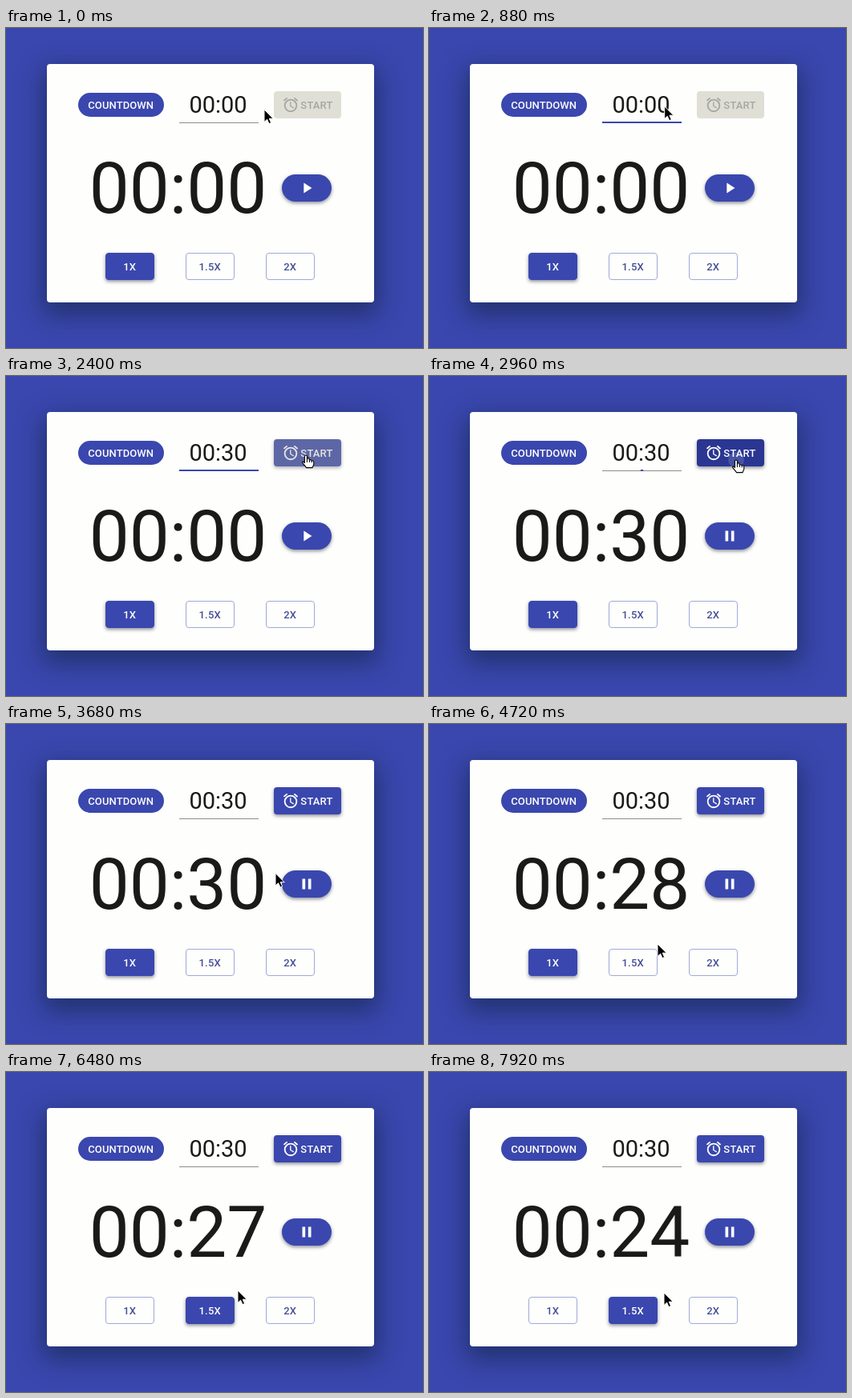
Recreate the animation shown at these times as an HTML page. Size 520 by 400 pixels, loop 8 s.

```html
<!DOCTYPE html>
<html lang="en">
<head>
<meta charset="utf-8">
<title>Countdown</title>
<style>
  html, body { margin: 0; width: 100%; height: 100%; overflow: hidden; background: #3a47ae; }
  #stage { position: relative; width: 520px; height: 400px; overflow: hidden; background: #3a47ae; font-family: Roboto, sans-serif; }
  #stage > * { position: absolute; box-sizing: border-box; }
  #card { left: 51px; top: 45px; width: 408px; height: 298px; border-radius: 4px; background: #fefefc; box-shadow: 0 11px 30px 5px rgba(24, 42, 86, .7); }
  .btn { display: flex; align-items: center; justify-content: center; overflow: hidden; height: 34px; border-radius: 4px; font-size: 13px; font-weight: 500; letter-spacing: .2px; color: #fefefc; background: #3a47ae; }
  #chip { left: 90px; top: 81px; width: 106.5px; height: 30px; border-radius: 15px; letter-spacing: .1px; }
  #start { left: 334px; top: 79px; width: 84px; }
  #start svg { margin-right: 1px; }
  #play { left: 344px; top: 183px; width: 62px; border-radius: 17px; box-shadow: 0 2px 4px rgba(30, 36, 60, .5); }
  .speed { top: 281px; width: 61.5px; border: 1px solid; }
  .btn svg { width: 22px; height: 22px; fill: currentColor; flex: none; }
  .time { display: flex; align-items: center; justify-content: center; color: #1a1a18; white-space: pre; }
  #field { left: 215px; top: 80px; width: 99px; height: 32px; font-size: 29px; }
  #clock { left: 95px; top: 150px; width: 239px; height: 100px; font-size: 89px; }
  #line { left: 216px; top: 118px; width: 99px; height: 1px; background: #8d8d8b; }
  #focus { left: 216px; top: 117px; width: 99px; height: 2px; background: #3a47ae; }
  .ripple { position: absolute; border-radius: 50%; background: #7480c4; }
  #arrow, #hand { left: 0; top: 0; width: 20px; height: 22px; overflow: visible; }
</style>
</head>
<body>
<div id="stage">
  <div id="card"></div>
  <div id="chip" class="btn">COUNTDOWN</div>
  <div id="field" class="time"></div>
  <div id="line"></div>
  <div id="focus"></div>
  <div id="start" class="btn">
    <i class="ripple"></i>
    <svg viewBox="0 0 24 24" style="position:relative"><path d="M22 5.7l-4.6-3.8-1.3 1.5 4.6 3.9zM7.9 3.4L6.6 1.9 2 5.7l1.3 1.5zM12.5 8H11v6l4.75 2.85.75-1.23-4-2.37zM12 4a9 9 0 1 0 0 18a9 9 0 1 0 0-18zm0 16a7 7 0 1 1 0-14a7 7 0 1 1 0 14z"/></svg>
    <span style="position:relative">START</span>
  </div>
  <div id="clock" class="time"></div>
  <div id="play" class="btn"><svg viewBox="0 0 24 24"><path/></svg></div>
  <div id="one" class="btn speed" style="left:123.5px">1X</div>
  <div id="mid" class="btn speed" style="left:223.5px"><i class="ripple"></i><span style="position:relative">1.5X</span></div>
  <div id="two" class="btn speed" style="left:323.5px">2X</div>
  <svg id="arrow"><path d="M0 0V15.5L3.6 12.2 6 17.6 8.6 16.4 6.2 11.2H11.2Z" fill="#000" stroke="#fefefc"/></svg>
  <svg id="hand"><path d="M-1.6 1Q0-1 1.4 1V6Q3-.2 4.4 6.4Q6 4.8 7.2 7Q9.2 6 9.8 8.6V11.5L8 15.6H.6L-4.4 9.4Q-4.6 7-1.6 9.2Z" fill="#fefefc" stroke="#000" stroke-width="1.1"/><path d="M1.4 6V9M4.4 6.4V9M7.2 7V9.4" stroke="#000" fill="none"/></svg>
</div>
<script>
const LOOP = 8000, INDIGO = '#3a47ae', DARK = '#2a3692', PAPER = '#fefefc';
const FOCUS = 640, PRESS = 2825, RUN = 2890, SPEED_PRESS = 5210, SPEED = 5290;
const TICKS = [3790, 4680, 5880, 6540, 7200, 7860];
const PATH = [[0, 322, 102], [480, 290, 98], [800, 290, 98], [1440, 374, 99], [2600, 374, 99],
  [2800, 383, 105], [3000, 383, 105], [4400, 285, 275], [4800, 285, 275], [5180, 273, 288],
  [5600, 273, 288], [6300, 289, 273], [6800, 289, 273], [7600, 293, 276], [8000, 293, 276]];

const $ = id => document.getElementById(id);
const ramp = (t, from, ms) => Math.min(1, Math.max(0, (t - from) / ms));
const smooth = x => x * x * (3 - 2 * x);
const fade = (t, from, ms = 250) => smooth(ramp(t, from, ms));
const decel = x => 1 - (1 - x) ** 3;
const mix = (a, b, k) => `color-mix(in srgb, ${b} ${k * 100}%, ${a})`;
const shadow = k => `0 2px 4px rgba(30, 36, 60, ${.5 * k})`;

function pointer(t) {
  const i = PATH.findIndex(p => p[0] > t);
  const [t0, x0, y0] = PATH[i - 1], [t1, x1, y1] = PATH[i];
  const k = fade(t, t0, t1 - t0);
  return [x0 + (x1 - x0) * k, y0 + (y1 - y0) * k];
}

function ripple(button, t, from, x, y) {
  const el = button.querySelector('.ripple'), r = 68 * fade(t, from, 550);
  Object.assign(el.style, {
    left: x - r + 'px', top: y - r + 'px', width: 2 * r + 'px', height: 2 * r + 'px',
    opacity: .4 * (1 - fade(t, from + 400, 400))
  });
}

// k: 0 = outlined, 1 = filled
function speedButton(el, k, fill, rest = PAPER) {
  Object.assign(el.style, {
    background: mix(rest, fill, k), borderColor: mix('#a0a9d6', fill, k),
    color: mix('#444f98', PAPER, k), boxShadow: shadow(k)
  });
}

function draw(t) {
  const typed = t < 2000 ? '00:00' : t < 2240 ? '00:03' : '00:30';
  const left = t < RUN ? 0 : 30 - TICKS.filter(at => t >= at).length;
  $('field').textContent = typed;
  $('clock').textContent = '00:' + String(left).padStart(2, '0');
  $('focus').style.transform = `scaleX(${decel(ramp(t, FOCUS, 200)) - decel(ramp(t, PRESS, 200))})`;

  const on = fade(t, 2240), hover = 1 - fade(t, 3250);
  Object.assign($('start').style, {
    background: mix('#dfdfd6', mix(INDIGO, DARK, hover), on),
    color: mix('#a7a7a0', PAPER, on), boxShadow: shadow(on)
  });
  ripple($('start'), t, PRESS, 49, 26);

  $('play').querySelector('path').setAttribute('d',
    t < RUN ? 'M8 5v14l11-7z' : 'M6 19h4V5H6zM14 5v14h4V5z');

  const over = fade(t, 5000) - fade(t, 5950), picked = fade(t, SPEED);
  speedButton($('one'), 1 - picked, INDIGO);
  speedButton($('mid'), picked, mix(INDIGO, DARK, over), mix(PAPER, '#f4f5fa', over));
  speedButton($('two'), 0, INDIGO);
  ripple($('mid'), t, SPEED_PRESS, 48, 7);

  const [x, y] = pointer(t);
  const inside = (bx, by, w) => x > bx && x < bx + w && y > by && y < by + 34;
  const link = t >= 2240 && inside(334, 79, 84) || inside(224, 281, 61);
  for (const id of ['arrow', 'hand']) {
    $(id).style.transform = `translate(${x}px, ${y}px)`;
    $(id).style.visibility = (id === 'hand') === link ? 'visible' : 'hidden';
  }
}

const begin = performance.now();
function frame() {
  draw((performance.now() - begin) % LOOP);
  requestAnimationFrame(frame);
}
frame();
</script>
</body>
</html>
```
